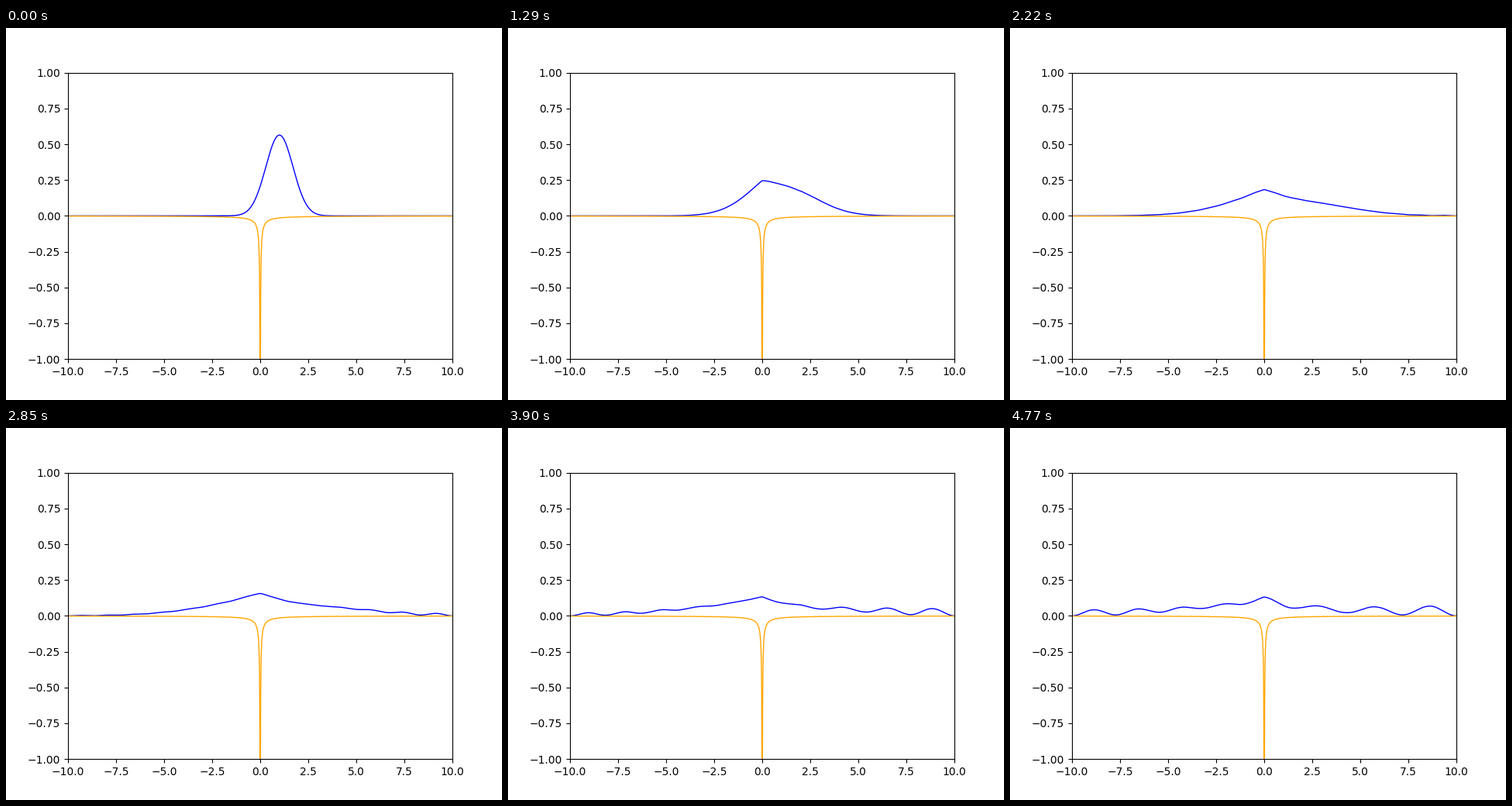
Recreate the animation shown at these times as a matplotlib script. Size 640x480 px, loop 4800 ms.

```python
import numpy as np
import matplotlib.pyplot as plt
from matplotlib.animation import FuncAnimation

FRAMES = 160
INTERVAL = 30          # ms
DT = 0.05              # simulated time per frame
HALF = 1000            # grid points on each side of the origin
CHARGE = 0.0144        # strength of the Coulomb well

x = np.linspace(-10, 10, 2 * HALF)
dx = x[1] - x[0]
potential = -CHARGE / np.abs(x)
psi0 = np.pi ** -0.25 * np.exp(-(x - 1) ** 2 / 2)


def evolve(start, parity):
    """Evolve an even (+1) or odd (-1) state on the half line x > 0."""
    diag = 1 / dx ** 2 + potential[HALF:]
    diag[0] -= parity / (2 * dx ** 2)
    off = np.full(HALF - 1, -0.5 / dx ** 2)
    energy, modes = np.linalg.eigh(np.diag(diag) + np.diag(off, 1) + np.diag(off, -1))
    times = DT * np.arange(FRAMES)
    phases = np.exp(-1j * np.outer(energy, times))
    return modes @ ((modes.T @ start)[:, None] * phases)


# The well is symmetric, so the two parities evolve independently.
right, left = psi0[HALF:], psi0[:HALF][::-1]
even = evolve((right + left) / 2, 1)
odd = evolve((right - left) / 2, -1)
density = np.abs(np.vstack([(even - odd)[::-1], even + odd])) ** 2

fig, ax = plt.subplots(figsize=(6.4, 4.8), dpi=100)
ax.set_xlim(-10, 10)
ax.set_ylim(-1, 1)
wave, = ax.plot(x, density[:, 0], color="blue", lw=1)
ax.plot(x, potential, color="orange", lw=1)


def update(i):
    wave.set_ydata(density[:, i])
    return wave,


anim = FuncAnimation(fig, update, frames=FRAMES, interval=INTERVAL, repeat=True, repeat_delay=0)
plt.show()
```
